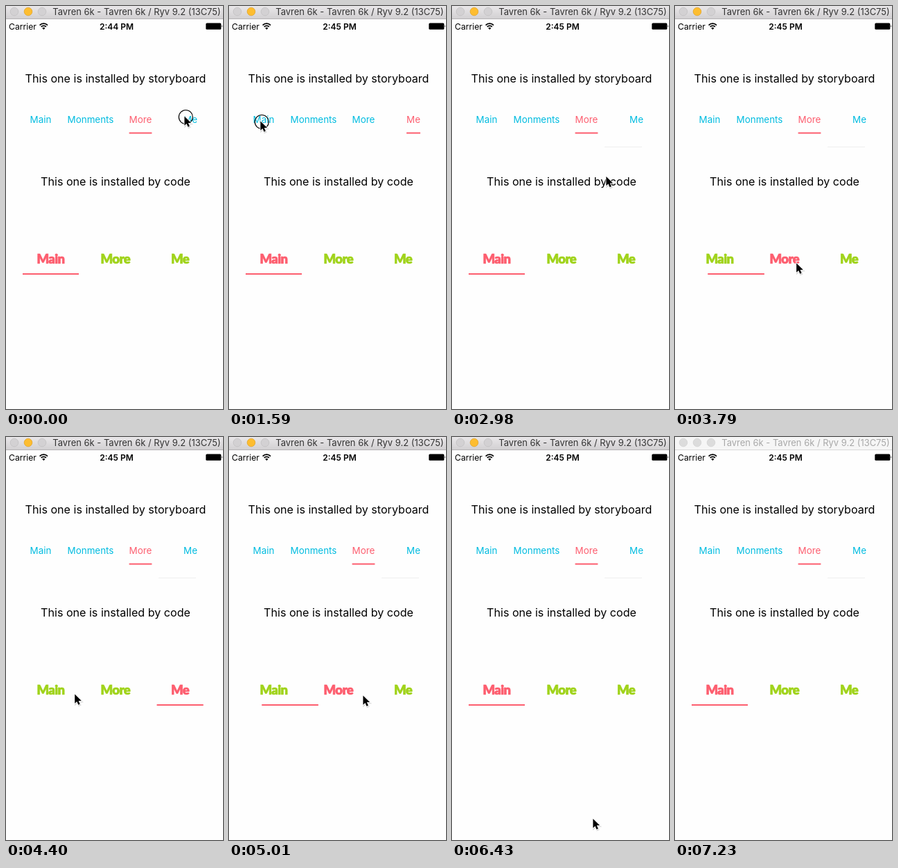
An HTML page that plays this animation: 313 by 579 pixels, repeating every 7.25 s.

```html
<!DOCTYPE html>
<html>
<head>
<meta charset="utf-8">
<style>
  html, body { margin: 0; width: 100%; height: 100%; overflow: hidden; background: #fefefe; }
  svg { display: block; width: 313px; height: 579px; font-family: Inter, Roboto, sans-serif; }
  text { text-anchor: middle; }
  #top text { font-size: 13.4px; }
  #bottom text { font: 900 18.4px Lato, "Open Sans", sans-serif; letter-spacing: -.6px; stroke: currentColor; stroke-width: .7px; }
  #top, #bottom { fill: currentColor; }
</style>
</head>
<body>
<svg viewBox="0 0 313 579">
  <defs>
    <linearGradient id="chrome" x2="0" y2="1">
      <stop stop-color="#e9e7e9"/><stop offset="1" stop-color="#d2d0d2"/>
    </linearGradient>
    <path id="arrow" d="M0 0V14.6L3.3 11.5 5.6 16.7 8.1 15.6 5.9 10.5H10.5Z"/>
  </defs>
  <rect width="313" height="579" fill="#fefefe"/>

  <rect id="bar" width="313" height="18"/>
  <rect id="edge" y="18" width="313" height="1"/>
  <g stroke-width=".7">
    <circle class="light" cx="12" cy="8" r="5.8"/>
    <circle class="light" cx="32" cy="8" r="5.8"/>
    <circle class="light" cx="52" cy="8" r="5.8"/>
  </g>
  <text id="title" x="188.5" y="13" font-size="12.95">Tavren 6k - Tavren 6k / Ryv 9.2 (13C75)</text>

  <text x="24" y="33.5" font-size="12.2">Carrier</text>
  <path d="M48.6 27.6a8 8 0 0 1 11.4 0M50.7 29.9a5 5 0 0 1 7.2 0" fill="none" stroke="#000" stroke-width="1.7"/>
  <path d="M54.3 34l-2.1-2.2a3 3 0 0 1 4.2 0z"/>
  <text id="clock" x="159.5" y="33.5" font-size="12" font-weight="600"></text>
  <rect x="288.3" y="24.5" width="22" height="9.3" rx="1.5"/>
  <path d="M311 27.3q1.6 1.7 0 3.4z"/>

  <g font-size="16.1">
    <text x="158" y="110.3">This one is installed by storyboard</text>
    <text x="158" y="258.3">This one is installed by code</text>
  </g>
  <g id="top"></g>
  <g id="bottom"></g>
  <path id="trace" d="M220 202.5H274" stroke="#efefef"/>

  <g id="pointer">
    <circle id="press" cx="2.3" cy="1.5" r="10" fill="none" stroke="#000" stroke-width="1.2"/>
    <g transform="translate(.4 .4) scale(.92)">
      <use href="#arrow" x=".8" y="1.4" fill="none" stroke="#000" stroke-opacity=".15" stroke-width="2"/>
      <use href="#arrow" stroke="#fff" stroke-width="1.8" paint-order="stroke"/>
    </g>
  </g>
</svg>
<script>
const LOOP = 7250, STEP = 88, START = 166, PINK = '#fd5e6f';
const SLIDE = 2.65, DELAY = .13, TRAVEL = 6; // in steps
const $ = id => document.getElementById(id);
const lerp = (a, b, k) => a + (b - a) * k;
const ease = k => (k = Math.min(1, k), k * k * (3 - 2 * k));

const tap = (at, x, y) => ({ at, x, y, press: true });
const pass = (at, x, y) => ({ at, x, y });
const path = [
  tap(-1, 257, 158), tap(16, 45, 165), tap(20, 118, 164), tap(28, 223, 171),
  pass(36, 221, 318), pass(38, 151, 369),
  tap(40, 151, 369), tap(44, 246, 369), tap(49, 62, 369),
  tap(54, 175, 371), tap(58, 247, 371), tap(63.25, 66, 372),
  pass(64, 75, 382), pass(71, 203, 548)
];
const taps = path.filter(p => p.press);

// Evenly spaced tabs; a tap selects the one under it and the line slides there.
function tabRow({ id, names, x, gap, baseline, lineY, pad, color, first, hit }) {
  const row = $(id), center = i => x + gap * i;
  row.innerHTML = names.map((name, i) => `<text x="${center(i)}" y="${baseline}">${name}</text>`).join('') +
    `<rect y="${lineY}" height="2" fill="${PINK}"/>`;
  const labels = [...row.querySelectorAll('text')], line = row.querySelector('rect');
  const widths = labels.map(label => label.getComputedTextLength() + pad);
  const moves = taps.filter(hit).map(p => ({
    start: p.at + DELAY,
    tab: Math.floor((p.x - x) / gap + .5)
  }));
  return n => {
    let from = first, to = first, k = 1;
    for (const { start, tab } of moves) if (n >= start) {
      from = to;
      to = tab;
      k = ease((n - start) / SLIDE);
    }
    const w = lerp(widths[from], widths[to], k);
    line.setAttribute('x', lerp(center(from), center(to), k) - w / 2);
    line.setAttribute('width', w);
    labels.forEach((label, i) => label.style.color = i === to ? PINK : color);
  };
}

const drawTop = tabRow({
  id: 'top', names: ['Main', 'Monments', 'More', 'Me'], x: 50, gap: 72, baseline: 168,
  lineY: 181.5, pad: 0, color: '#00bce0', first: 2, hit: p => p.y < 300
});
const drawBottom = tabRow({
  id: 'bottom', names: ['Main', 'More', 'Me'], x: 64.5, gap: 93.3, baseline: 370,
  lineY: 384, pad: 41, color: '#a0d31b', first: 0, hit: p => p.y > 300
});

function drawPointer(n) {
  const i = path.findLastIndex(p => p.at <= n);
  const a = path[i], b = path[i + 1] || a;
  const k = a === b ? 1 : Math.min(1, (n - a.at) / Math.min(TRAVEL, b.at - a.at));
  $('pointer').setAttribute('transform', `translate(${lerp(a.x, b.x, k)} ${lerp(a.y, b.y, k)})`);
  $('pointer').style.display = n < 72 ? '' : 'none';
  $('press').style.display = taps.some(p => Math.floor(p.at) === n) ? '' : 'none';
}

function drawWindow(active) {
  $('bar').setAttribute('fill', active ? 'url(#chrome)' : '#f6f6f6');
  $('edge').setAttribute('fill', active ? '#b5b3b5' : '#d8d8d8');
  $('title').setAttribute('fill', active ? '#333' : '#a8a8a8');
  document.querySelectorAll('.light').forEach((light, i) => {
    const lit = active && i === 1;
    light.setAttribute('fill', lit ? '#fdbd30' : active ? '#d3d1d3' : '#dcdcdc');
    light.setAttribute('stroke', lit ? '#e0a020' : active ? '#bfbdbf' : '#d0d0d0');
  });
}

function draw(now) {
  const t = now % LOOP, n = Math.max(-1, Math.floor((t - START) / STEP));
  drawWindow(t < 7230);
  $('clock').textContent = n < 4 ? '2:44 PM' : '2:45 PM';
  $('trace').style.display = n < 31 ? 'none' : '';
  drawTop(n);
  drawBottom(n);
  drawPointer(n);
}

const begin = performance.now();
function tick() {
  draw(performance.now() - begin);
  requestAnimationFrame(tick);
}
tick();
</script>
</body>
</html>
```
